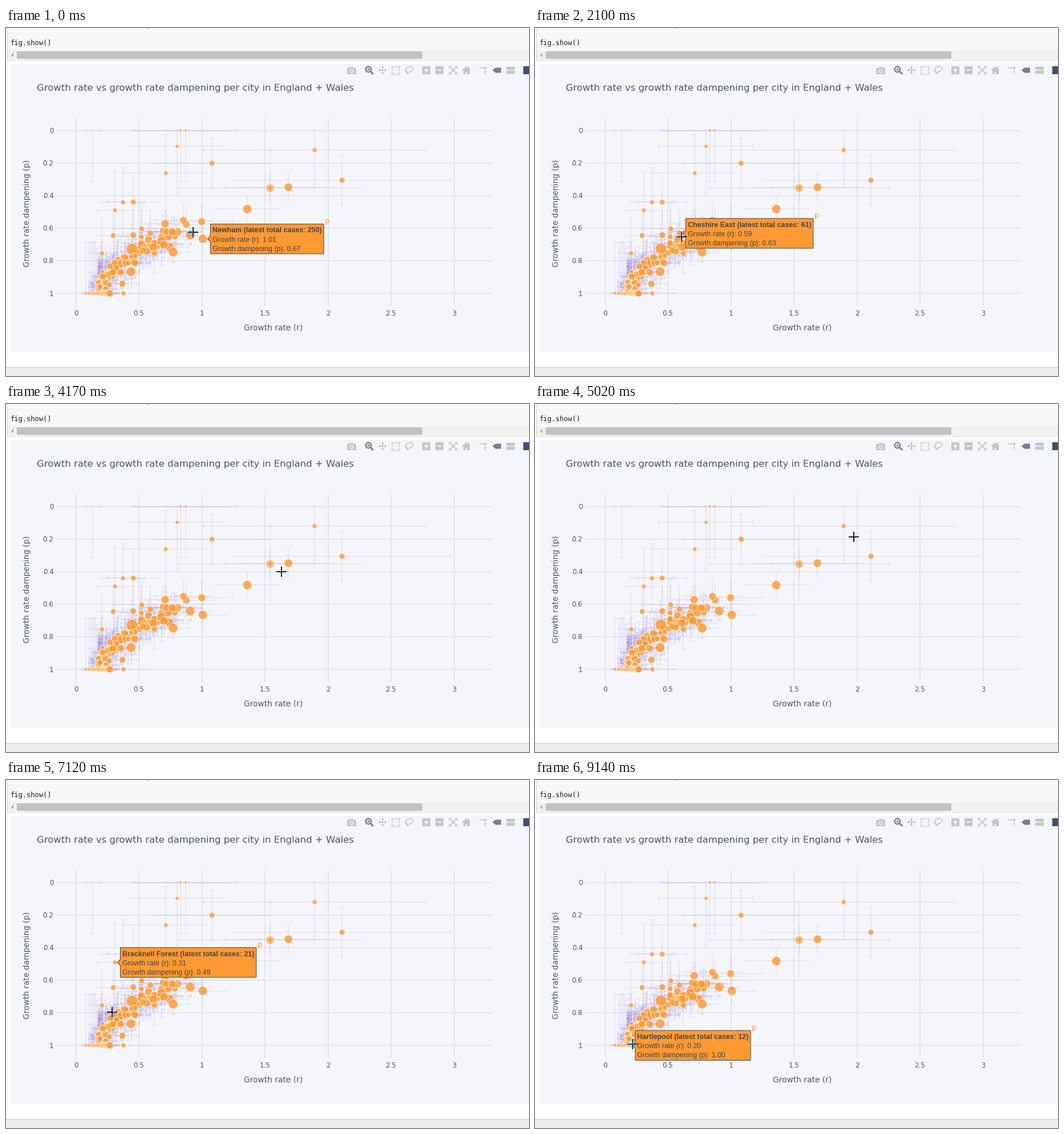
A matplotlib script that plays this animation: 917x610 px, repeating every 9.37 s.

```python
import numpy as np
import matplotlib.pyplot as plt
from matplotlib.animation import FuncAnimation
from matplotlib.collections import LineCollection
from matplotlib.patches import Circle, PathPatch, Polygon, Rectangle
from matplotlib.path import Path

W, H, DPI = 917, 610, 64
LOOP, FRAMES = 9370, 312
STEP = LOOP / FRAMES
TICK = 77  # ms between two cursor positions
PT = 72 / DPI  # points per pixel

ORANGE, INK, DARK = "#FF9933", "#4D5663", "#444444"
PANEL, GRID, ICON, ACTIVE = "#F5F6F9", "#E2E5EE", "#C3C5CA", "#7C7F86"

X0, Y0, SX, SY = 122.5, 179.5, 221, 285.6  # data to pixel mapping

# growth rate, dampening, cases
PLACES = {
    "Newham": (1.007, .6655, 250), "Lambeth": (.907, .642, 290),
    "Ealing": (.699, .702, 201), "Camden": (.613, .716, 186),
    "South Tyneside": (.44, .773, 31), "Leicestershire": (.455, .643, 74),
    "Rochdale": (.518, .653, 46), "Cheshire East": (.592, .6315, 61),
    "Southwark": (.708, .5725, 162), "Islington": (.763, .6225, 152),
    "Greenwich": (.876, .576, 125), "Merton": (.998, .56, 140),
    "Wandsworth": (1.36, .483, 254), "Salford": (1.541, .3535, 160),
    "Kensington and Chelsea": (1.686, .3485, 189),
    "Brighton and Hove": (2.111, .3064, 52), "Blackpool": (1.894, .1208, 27),
    "Isle of Anglesey": (.83, 0, 4), "Merthyr Tydfil": (.133, 0, 1),
    "Bracknell Forest": (.31, .491, 21), "Wolverhampton": (.271, .8333, 74),
    "Cambridgeshire": (.265, .948, 48), "Gloucestershire": (.238, .972, 51),
    "Hartlepool": (.201, 1, 12),
}
UNNAMED = [
    (.871, 0, 4), (.803, .098, 14), (.713, .262, 21), (1.08, .201, 49),
    (1.541, .352, 22), (.373, .441, 26), (.455, .44, 46), (.296, .645, 45),
    (.853, .552, 125), (.772, .747, 300), (.437, .867, 300), (.208, .754, 24),
    (.377, 1, 25), (.369, .941, 95), (.522, .604, 47),
]

# cursor legs: start, arrival, x, y, place labelled on arrival
TOUR = [
    (0, 0, 328.5, 358, "Newham"), (80, 540, 217, 401, "South Tyneside"),
    (1090, 1320, 225, 383, "Leicestershire"), (1550, 1850, 257, 366, "Cheshire East"),
    (2180, 2330, 273, 352, "Southwark"), (2800, 2940, 292, 354, "Islington"),
    (3400, 3710, 434, 325, "Wandsworth"), (3940, 4250, 495, 286, "Kensington and Chelsea"),
    (4480, 4790, 588, 268, "Brighton and Hove"), (4870, 5020, 559, 233, None),
    (5100, 5340, 545, 222, "Blackpool"), (5490, 6030, 291, 188, "Isle of Anglesey"),
    (6350, 6730, 162, 186, "Merthyr Tydfil"), (6960, 7120, 186, 407, "Bracknell Forest"),
    (7200, 7270, 184, 417, "Wolverhampton"), (7820, 8130, 182, 446, "Cambridgeshire"),
    (8600, 8740, 173, 457, "Gloucestershire"), (9140, 9140, 171, 463, "Hartlepool"),
]

fig = plt.figure(figsize=(W / DPI, H / DPI), dpi=DPI, facecolor="white")
ax = fig.add_axes([0, 0, 1, 1])
ax.set_xlim(0, W)
ax.set_ylim(H, 0)
ax.axis("off")


def rect(x, y, w, h, color):
    ax.add_patch(Rectangle((x, y), w, h, color=color, lw=0))


def poly(points, color):
    ax.add_patch(Polygon(points, color=color, lw=0))


def disc(x, y, r, color):
    ax.add_patch(Circle((x, y), r, color=color, lw=0))


def line(xs, ys, color, width=1, **kw):
    return ax.plot(xs, ys, color=color, lw=width * PT, solid_capstyle="butt", **kw)[0]


def text(x, y, s, size, color=INK, font="DejaVu Sans", **kw):
    return ax.text(x, y, s, fontsize=size * PT, color=color, family=font, **kw)


def to_px(r, p):
    return X0 + r * SX, Y0 + p * SY


def radius(cases):
    return 1.65 * cases ** .285


def draw_page():
    rect(3, 0, W, 40, "#F7F7F7")
    rect(3, 40, W, 15, "#F1F1F1")
    rect(19, 41, 711, 13, "#C1C1C1")
    poly([(9, 47.5), (13, 44), (13, 51)], "#A3A3A3")
    rect(2, 0, 1, 57, "#CFCFCF")
    rect(2, 56, W, 1, "#CFCFCF")
    rect(247, 0, 2, 1, "#777777")
    text(8, 30, "fig.show()", 12.1, "#222222", "DejaVu Sans Mono")
    rect(8, 63, W, 505, PANEL)
    rect(0, 594, W, 16, "#EEEEEE")
    rect(0, 594, W, 1, "#D5D5D5")
    rect(0, 595, W, 1, "#E2E2E2")


def draw_toolbar():
    # camera
    rect(598, 70, 16, 11, ICON)
    rect(603, 68, 6, 3, ICON)
    disc(606, 75.5, 3.6, PANEL)
    disc(606, 75.5, 2, ICON)
    # magnifier
    ax.add_patch(Circle((635.5, 72.5), 4.8, fc="none", ec=ACTIVE, lw=2.3 * PT))
    line([639, 644], [76, 81], ACTIVE, 3)
    line([633, 638], [72.5, 72.5], ACTIVE, 1.5)
    line([635.5, 635.5], [70, 75], ACTIVE, 1.5)
    # pan
    line([654, 666], [74, 74], ICON, 1.6)
    line([660, 660], [68, 80], ICON, 1.6)
    for dx, dy in ((1, 0), (-1, 0), (0, 1), (0, -1)):
        tip = np.array([660 + 7.5 * dx, 74 + 7.5 * dy])
        back, side = 3.5 * np.array([dx, dy]), 3 * np.array([dy, dx])
        poly([tip, tip - back + side, tip - back - side], ICON)
    # box select: a ring of dots
    for k in range(5):
        for x, y in ((k, 0), (k, 4), (0, k), (4, k)):
            rect(675.5 + 3.4 * x, 66.5 + 3.4 * y, 2, 2, ICON)
    # lasso
    a = np.linspace(0, 2 * np.pi, 40)
    line(707 + 6.5 * np.cos(a), 72.5 + 4.8 * np.sin(a) - 1.5 * np.cos(a), ICON, 1.7)
    line([702, 702.5, 705, 703], [75, 78, 78.5, 81], ICON, 1.7)
    # zoom in, zoom out
    for x in (737, 760):
        rect(x - 7, 67, 14, 14, ICON)
        rect(x - 4, 73, 8, 2, PANEL)
    rect(736, 70, 2, 8, PANEL)
    # autoscale
    for s in (1, -1):
        line([779, 789], [74 - 5 * s, 74 + 5 * s], ICON, 1.8)
        for u in (1, -1):
            cx, cy = 784 + 7.5 * s, 74 + 7.5 * u
            poly([(cx, cy), (cx - 5 * s, cy), (cx, cy - 5 * u)], ICON)
    # home
    poly([(799, 74.5), (807, 67), (815, 74.5)], ICON)
    rect(801.5, 74, 11, 6.5, ICON)
    rect(805.7, 76.5, 2.6, 4, PANEL)
    rect(811, 68, 2, 4, ICON)
    # spike lines
    for x in (830, 834):
        rect(x, 69, 2.5, 2, ICON)
    rect(838, 68, 4, 4, ICON)
    for y in (74, 78):
        rect(839, y, 2, 2.5, ICON)
    # hover tags
    poly([(853, 74), (858, 69.5), (868, 69.5), (868, 78.5), (858, 78.5)], ACTIVE)
    for y in (70.5, 77.5):
        poly([(876, y), (879, y - 2.8), (892, y - 2.8), (892, y + 2.8), (879, y + 2.8)], ICON)
    rect(907, 67, 14, 14, "#3F4F75")


def draw_axes():
    for k in range(7):
        x, _ = to_px(k / 2, 0)
        line([x, x], [158, 487], GRID, 2)
        text(x, 503.5, f"{k / 2:g}", 12, ha="center")
    for k in range(6):
        _, y = to_px(0, k / 5)
        line([87, 852], [y, y], GRID, 2)
        text(83.5, y + 4.5, f"{k / 5:g}", 12, ha="right")
    text(54, 110, "Growth rate vs growth rate dampening per city in England + Wales", 16.48)
    text(468.5, 529.5, "Growth rate (r)", 13.7, ha="center")
    text(37.5, 325, "Growth rate dampening (p)", 13.7, rotation=90, ha="center", va="center")


def make_cities():
    """Rows of growth rate, dampening and cases, in drawing order."""
    rng = np.random.default_rng(11)
    n = 105
    r = .18 + .63 * rng.random(n) ** 2.1
    p = .535 + .63 * np.exp(-r / .45) + rng.normal(0, .028, n)
    cloud = np.column_stack([r, np.minimum(p, .99), (50 + 130 * r) * rng.lognormal(0, .45, n)])
    f = np.linspace(0, 1, 17)
    floor = np.column_stack([.08 + .19 * f ** .7, np.ones(17), 6 + 95 * f ** 2])
    return np.vstack([cloud, list(PLACES.values()), UNNAMED, floor])


def draw_bars(cities):
    # the error shrinks with the square root of the cases
    segs = []
    for r, p, cases in cities:
        x, y = to_px(r, p)
        dx = 650 * r / np.sqrt(max(cases, 40))
        dy = 310 / np.sqrt(max(cases, 12))
        left, right = x - dx, x + dx
        top, bottom = max(y - dy, Y0), min(y + dy, Y0 + SY)
        segs += [[(left, y), (right, y)], [(x, top), (x, bottom)]]
        segs += [[(e, y - 3), (e, y + 3)] for e in (left, right)]
        segs += [[(x - 3, e), (x + 3, e)] for e in (top, bottom)]
    ax.add_collection(LineCollection(segs, colors=[(.61, .53, .88, .13)],
                                     linewidths=2 * PT, zorder=3))


draw_page()
draw_toolbar()
draw_axes()
cities = make_cities()
draw_bars(cities)
xs, ys = to_px(cities[:, 0], cities[:, 1])
sizes = radius(cities[:, 2])
ax.scatter(xs, ys, s=(2 * sizes * PT) ** 2, facecolors=[(1, .6, .2, .8)],
           edgecolors=[(1, 1, 1, .8)], linewidths=1 * PT, zorder=4)

# hover label
box = PathPatch(Path([(0, 0), (1, 1)]), fc=ORANGE, ec=DARK, lw=1 * PT, zorder=6)
ax.add_patch(box)
rows = [text(0, 0, "", 12.4, DARK, "Liberation Sans", zorder=7,
             weight="bold" if k == 0 else "normal") for k in range(3)]
trace = text(0, 0, "p", 12.5, ORANGE, zorder=7)

# crosshair, with inverted colour where it lies over markers
discs = Path.make_compound_path(*[Path.circle(c, s) for *c, s in zip(xs, ys, sizes)])
cross = line([], [], "#0A0906", 1.8, zorder=8)
cross_inv = line([], [], "#024F9C", 1.8, zorder=9)
cross_inv.set_clip_path(discs, ax.transData)


def nearest_place(x, y, reach=16):
    def gap(name):
        px, py = to_px(*PLACES[name][:2])
        return np.hypot(px - x, py - y)
    best = min(PLACES, key=gap)
    return best if gap(best) < reach else None


def pose(t):
    """Cursor position and labelled place; the cursor jumps once per tick."""
    x = y = name = None
    for start, end, ex, ey, target in TOUR:
        if t < start:
            break
        if t >= end:
            x, y, name = ex, ey, target
        else:
            steps = round((end - start) / TICK) + 1
            f = (int((t - start) / (end - start) * (steps - 1)) + 1) / steps
            x, y = x + (ex - x) * f, y + (ey - y) * f
            name = nearest_place(x, y)
    return round(x), round(y), name


def show_label(name):
    for art in (box, trace, *rows):
        art.set_visible(name is not None)
    if name is None:
        return
    r, p, cases = PLACES[name]
    x, y = to_px(r, p)
    tip = x + radius(cases) + .5
    left, top, bottom = tip + 5, y - 26, y + 26.2
    lines = (f"{name} (latest total cases: {cases})",
             f"Growth rate (r): {r:.2f}", f"Growth dampening (p): {p:.2f}")
    for k, (row, s) in enumerate(zip(rows, lines)):
        row.set_text(s)
        row.set_position((left + 3.5, y - 11.2 + 16.2 * k))
    right = left + 7 + max(row.get_window_extent().width for row in rows)
    box.set_path(Path([(tip, y), (left, y - 5.5), (left, top), (right, top),
                       (right, bottom), (left, bottom), (left, y + 5.5), (tip, y)],
                      closed=True))
    trace.set_position((right + 2, y - 27.5))


def update(i):
    x, y, name = pose((i + 1) * STEP)
    show_label(name)
    for art in (cross, cross_inv):
        art.set_data([x - 9, x + 9, np.nan, x, x], [y, y, np.nan, y - 9, y + 9])
    return box, trace, *rows, cross, cross_inv


anim = FuncAnimation(fig, update, frames=FRAMES, interval=STEP, repeat=True,
                     repeat_delay=0, blit=False)
plt.show()
```
